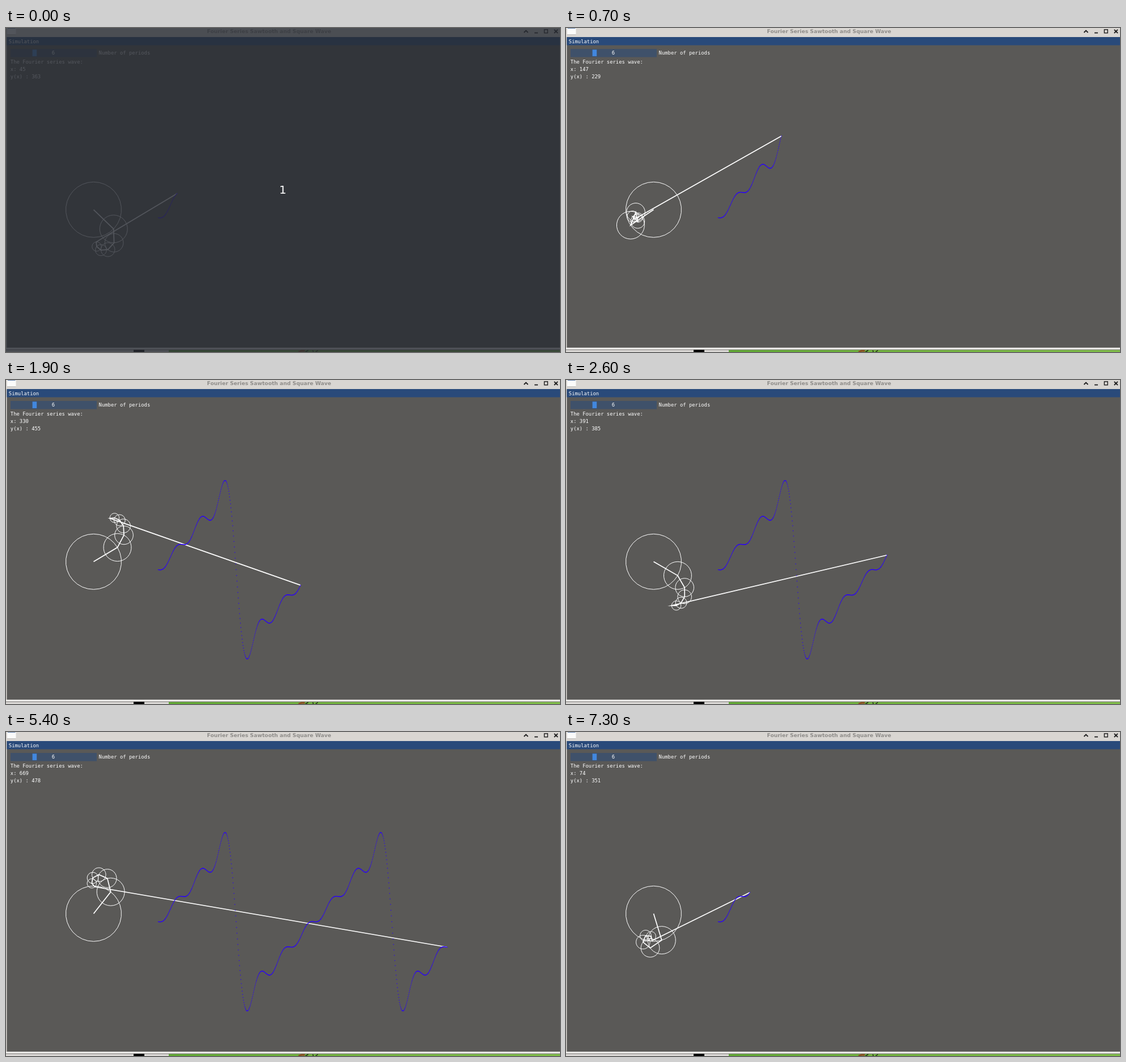
Write an HTML page with a canvas that moves like this. It is 977 px wide and 573 px high and loops after 8 s.

```html
<!DOCTYPE html>
<html lang="en">
<head>
<meta charset="utf-8">
<title>Fourier series</title>
<style>
html, body { margin: 0; width: 100%; height: 100%; overflow: hidden; background: #5a5957; }
canvas { display: block; }
</style>
</head>
<body>
<canvas id="stage" width="977" height="573"></canvas>
<script>
const ctx = document.getElementById('stage').getContext('2d');
const LOOP = 8000;
const SCALE = 0.7626;
const CENTER = { x: 154.5, y: 321.3 };
const RADIUS = 49;
const TERMS = 6;
const AMP = 97.7;
const DROOP = 2.2;
const WAVE = { x: 267.8, y: 335.5 };
const MONO = '8.87px "DejaVu Sans Mono", monospace';

const TICK = 100;
const SPEED = 15.3;
const RUNS = [
  [0, 45, 0], [100, 54, 0], [400, 103, 1], [700, 147, 12], [2000, 338, 0],
  [2100, 345, 0], [2400, 360.5, 2], [3800, 551, 0], [4600, 640, 0],
  [5400, 669, 0], [5900, 715, 0], [6400, 764, 0], [7300, 74, 0]
];

function position(t) {
  const [start, x, ticks] = RUNS.findLast(run => run[0] <= t);
  return Math.floor(x + SPEED * Math.min(ticks, Math.floor((t - start) / TICK)));
}

const rad = deg => deg * Math.PI / 180;

// The angle trails the position by one degree.
const angle = (k, x) => rad(k * (x - 1));

// Alternating sawtooth series, sagging slightly in its lowest harmonics
function height(x) {
  let sum = 0;
  for (let k = 1; k <= TERMS; k++) {
    const sign = k % 2 ? 1 : -1;
    sum += (sign * AMP / k - DROOP / (k * k)) * Math.sin(angle(k, x));
  }
  return sum;
}

const wavePoint = x => ({ x: WAVE.x + x * SCALE, y: WAVE.y - height(x) });

function rect(color, x, y, w, h) {
  ctx.fillStyle = color;
  ctx.fillRect(x, y, w, h);
}

function text(str, x, y, color = '#fff', font = MONO, align = 'left') {
  ctx.font = font;
  ctx.fillStyle = color;
  ctx.textAlign = align;
  ctx.fillText(str, x, y);
}

function path(points, color, width, closed) {
  ctx.beginPath();
  points.forEach(p => ctx.lineTo(p.x, p.y));
  if (closed) ctx.closePath();
  ctx.strokeStyle = color;
  ctx.lineWidth = width;
  ctx.stroke();
}

function line(color, width, ...xy) {
  const points = [];
  for (let i = 0; i < xy.length; i += 2) points.push({ x: xy[i], y: xy[i + 1] });
  path(points, color, width);
}

const polar = (c, r, a) => ({ x: c.x + r * Math.cos(a), y: c.y + r * Math.sin(a) });

function ring(c, r) {
  const points = Array.from({ length: 30 }, (_, i) => polar(c, r, rad(i * 12 - 90)));
  path(points, '#fff', 1, true);
}

function titleBar() {
  const ink = '#1c1c1c';
  rect('#d9d6d2', 0, 0, 977, 16);
  rect('#fbfbfa', 2, 0, 15.5, 12);
  rect('#5c7ba6', 3, 0, 13.5, 1);
  rect('#a9a7a4', 2, 11.4, 15.5, 0.8);
  text('Fourier Series Sawtooth and Square Wave', 464, 9.3, '#8f8d8a',
    'bold 9.2px "DejaVu Sans", sans-serif', 'center');
  line(ink, 1.8, 913.5, 8, 917, 4.5, 920.5, 8);
  line(ink, 1.8, 932, 8.6, 938, 8.6);
  ctx.lineWidth = 1.4;
  ctx.strokeRect(949.4, 2.8, 5.8, 6);
  line(ink, 1.8, 966.8, 2.8, 973, 9);
  line(ink, 1.8, 973, 2.8, 966.8, 9);
}

function bottomEdge() {
  rect('#f2f1ef', 0, 565.4, 977, 3.2);
  rect('#a3a19e', 0, 568.6, 977, 1);
  rect('#dad8d5', 0, 569.6, 287, 3.4);
  rect('#000', 225, 569.2, 19, 3.8);
  const green = ctx.createLinearGradient(287, 0, 977, 0);
  green.addColorStop(0, '#5fa832');
  green.addColorStop(0.4, '#71b23d');
  green.addColorStop(1, '#7fbd48');
  rect(green, 287, 569.6, 690, 3.4);
  line('#8a4a20', 3, 516, 573, 521, 571, 527, 571);
  line('#1f2a12', 1.5, 528, 573, 533, 570);
  line('#1f2a12', 1.5, 541, 570, 542, 573);
  line('#1f2a12', 1.5, 546, 573, 550, 570);
}

function panel(x) {
  rect('#294a7a', 1.5, 16, 975.5, 14.5);
  text('Simulation', 4.8, 26.8);
  rect('#3f516a', 8, 37, 152, 14.5);
  rect('#4287de', 46.6, 38.3, 7.6, 11.6);
  text('6', 83.5, 47.4, '#fff', MONO, 'center');
  text('Number of periods', 163.6, 47.4);
  text('The Fourier series wave:', 7.8, 62.6);
  text('x: ' + x, 7.8, 75.8);
  text('y(x) : ' + Math.round(419 - height(x) / SCALE), 7.8, 88.8);
}

function epicycles(x) {
  const joints = [CENTER];
  for (let k = 1; k <= TERMS; k++) {
    const c = joints[k - 1];
    const r = RADIUS / k;
    ring(c, r);
    joints.push(polar(c, r, angle(k, x)));
  }
  joints.push(wavePoint(x));
  path(joints, '#fff', 1.7);
}

function trail(x) {
  ctx.fillStyle = '#2a00ff';
  for (let i = 1; i <= x; i++) {
    const p = wavePoint(i);
    ctx.beginPath();
    ctx.arc(p.x, p.y, 0.76, 0, 2 * Math.PI);
    ctx.fill();
  }
}

function countdown() {
  rect('rgba(40,44,52,0.8)', 0, 0, 977, 573);
  text('1', 488, 293, '#fff', '20px "DejaVu Sans", sans-serif', 'center');
}

function draw(t) {
  const x = position(t);
  rect('#5a5957', 0, 0, 977, 573);
  titleBar();
  rect('#d9d6d2', 0, 16, 1.5, 550);
  panel(x);
  epicycles(x);
  trail(x);
  bottomEdge();
  if (t < TICK) countdown();
}

function tick() {
  draw(performance.now() % LOOP);
  requestAnimationFrame(tick);
}
tick();
</script>
</body>
</html>
```
